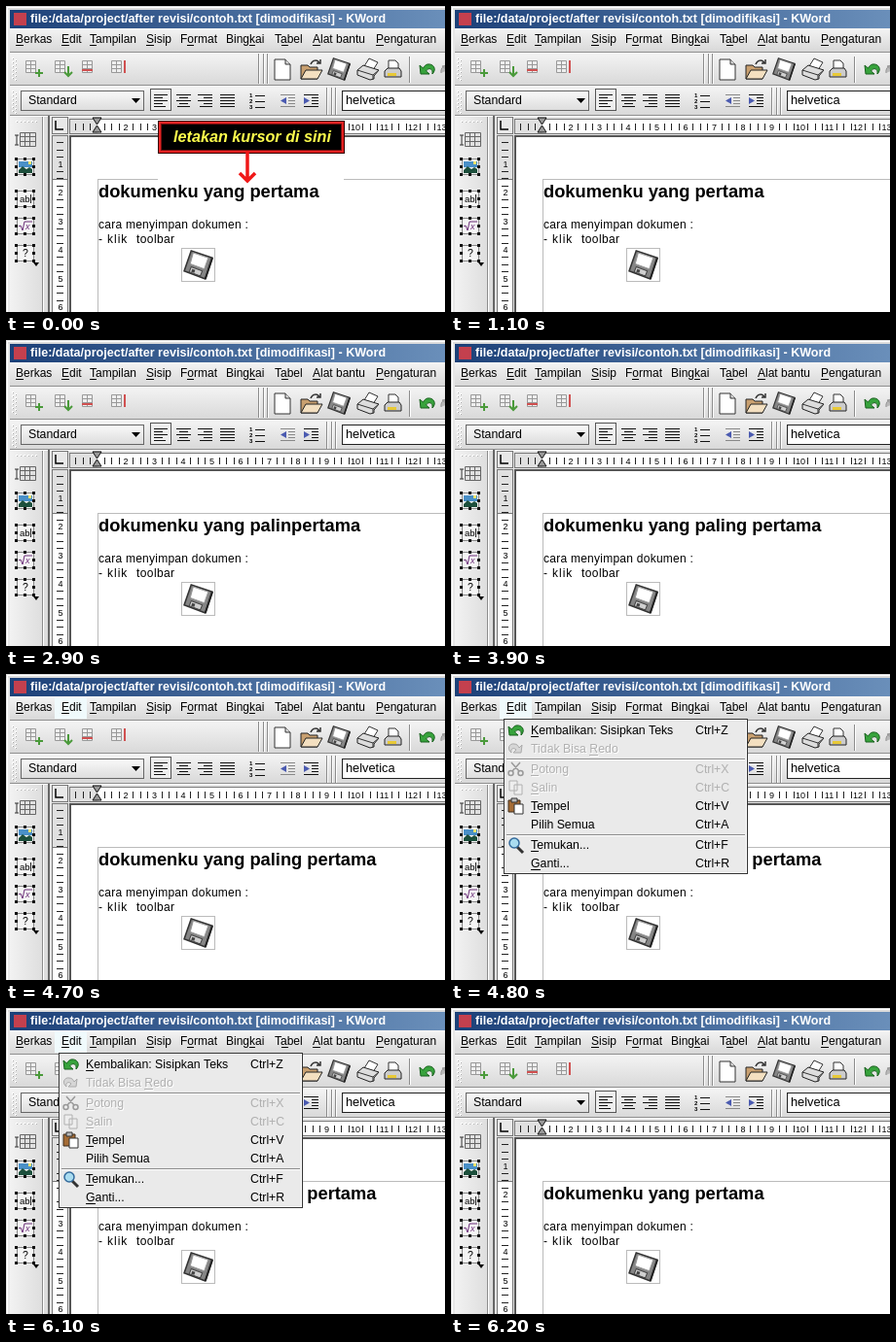
Animation of 451 by 315 pixels, one loop 8700 ms. Source, as an HTML page with a canvas:

```html
<!DOCTYPE html>
<html lang="id">
<head>
<meta charset="utf-8">
<title>Kembalikan teks</title>
<style>
html, body { margin: 0; width: 100%; height: 100%; overflow: hidden; background: #e6e6e6 }
canvas { display: block }
</style>
</head>
<body>
<canvas id="stage" width="451" height="315"></canvas>
<script>
const ctx = document.getElementById('stage').getContext('2d');
const LOOP = 8700;
const SANS = '"Liberation Sans", Arial, sans-serif';

function rect(color, x, y, w, h) {
  ctx.fillStyle = color;
  ctx.fillRect(x, y, w, h);
}

function gradient(from, to, x0, y0, x1, y1) {
  const g = ctx.createLinearGradient(x0, y0, x1, y1);
  g.addColorStop(0, from);
  g.addColorStop(1, to);
  return g;
}

function bar(y, h) {
  rect(gradient('#f4f4f4', '#d8d8d8', 0, y, 0, y + h), 4, y, 447, h);
}

function frame(color, x, y, w, h, lineWidth = 1) {
  ctx.strokeStyle = color;
  ctx.lineWidth = lineWidth;
  ctx.strokeRect(x + lineWidth / 2, y + lineWidth / 2, w - lineWidth, h - lineWidth);
}

// An '&' underlines the letter after it.
function text(label, x, y, size = 12, color = '#000', style = '', spacing = 0) {
  const at = label.indexOf('&');
  const plain = label.replace('&', '');
  ctx.font = `${style} ${size}px ${SANS}`;
  ctx.letterSpacing = spacing + 'px';
  ctx.fillStyle = color;
  ctx.fillText(plain, x, y);
  if (at >= 0) {
    const left = ctx.measureText(plain.slice(0, at)).width;
    rect(color, Math.round(x + left), y + 2, Math.round(ctx.measureText(plain[at]).width), 1);
  }
}

function shape(d, x, y, fill, stroke, lineWidth = 1) {
  const path = new Path2D(d);
  ctx.save();
  ctx.translate(x, y);
  if (fill) { ctx.fillStyle = fill; ctx.fill(path); }
  if (stroke) { ctx.strokeStyle = stroke; ctx.lineWidth = lineWidth; ctx.stroke(path); }
  ctx.restore();
}

function hLine(y, x = 4, w = 447) {
  rect('#8c8c8c', x, y, w, 1);
  rect('#fff', x, y + 1, w, 1);
}

function vLine(x, y, h) {
  rect('#8c8c8c', x, y, 1, h);
  rect('#fff', x + 1, y, 1, h);
}

function grip(x, y, h) {
  for (let i = 0; i < h; i += 4) {
    rect('#fff', x, y + i, 2, 2);
    rect('#aaa', x + 1, y + i + 1, 1, 1);
    rect('#fff', x + 3, y + i + 2, 2, 2);
    rect('#aaa', x + 4, y + i + 3, 1, 1);
  }
}

function floppy(x, y, size) {
  ctx.save();
  ctx.translate(x, y);
  ctx.scale(size / 30, size / 30);
  shape('M8 1L29 8L22 29L1 21Z', 0, 0, '#858585', '#333', 1.5);
  shape('M10 3L25 8L21 19L7 14Z', 0, 0, '#fff', '#999');
  shape('M8 17L19 21L17 26L6 22Z', 0, 0, '#d0d0d0', '#444');
  shape('M9 19L12 20L11 23L8 22Z', 0, 0, '#444');
  shape('M29 8L22 29', 0, 0, null, '#222', 2);
  ctx.restore();
}

function undoArrow(x, y) {
  shape('M0 3L1 12L10 12L6.500 9C9 5 14 6 13 12C18 7 14 1 8 2C6 2.500 4.500 4 3.500 6Z', x, y, '#37a33c', '#17601c');
}

function textLines(x, widths, align) {
  widths.forEach((w, i) => rect('#111', x + Math.round((15 - w) * align), 91 + i * 3, w, 1));
}

function titleBar() {
  rect('#dcdcdc', 0, 0, 451, 4);
  rect('#fff', 1, 1, 450, 1);
  rect(gradient('#1c4078', '#6a8fba', 4, 0, 451, 0), 4, 4, 447, 19);
  rect('#c4404e', 8, 7, 13, 13);
  text('file:/data/project/after revisi/contoh.txt [dimodifikasi] - KWord', 25, 17, 12.55, '#fff', 'bold');
}

function menuBar(editLit) {
  bar(23, 24);
  if (editLit) rect('#f0fafc', 50, 24, 33, 22);
  const labels = [['&Berkas', 10], ['&Edit', 57], ['&Tampilan', 86], ['&Sisip', 144], ['F&ormat', 179],
    ['Bing&kai', 226], ['T&abel', 276], ['&Alat bantu', 315], ['&Pengaturan', 380]];
  for (const [label, x] of labels) text(label, x, 38);
}

function tableIcon(x, extra, color) {
  shape('M0 0H10V12H0ZM0 4H10M0 8H10M5 0V12', x + .5, 56.5, '#eee', '#999');
  shape(extra, x, 56, null, color, 2);
}

function mainToolbar() {
  bar(48, 34);
  hLine(47);
  hLine(81);
  grip(6, 53, 24);
  tableIcon(20, 'M10 13H18M14 9V17', '#4a9a3a');
  tableIcon(50, 'M14 6V16M10 12L14 16L18 12', '#4a9a3a');
  tableIcon(78, 'M0 10H11', '#d05050');
  tableIcon(108, 'M14 0V13', '#d05050');
  for (const x of [259, 264, 268]) vLine(x, 49, 31);
  shape('M0 0H11L16 5V21H0Z', 276, 55, '#fff', '#333');
  shape('M11 0V5H16', 276, 55, '#ddd', '#333');
  // Folder
  shape('M1 20V6H8L10 8H18V20Z', 302, 55, '#c9a070', '#222');
  shape('M1 20L6 11H23L18 20Z', 302, 55, '#f3dfc0', '#222');
  shape('M11 5C13 0 18 0 20 4M17 4H21V0', 302, 55, null, '#333', 1.5);
  floppy(330, 53, 24);
  // Printer
  shape('M8 8L13 0L22 4L17 12Z', 360, 54, '#fff', '#333');
  shape('M1 12L7 7L23 12L18 18V21L14 22L1 17Z', 360, 54, '#ddd', '#222');
  shape('M1 12L17 17L23 12M17 17V21', 360, 54, null, '#333');
  // Print preview
  shape('M4 0H11L14 3V11H4Z', 389, 56, '#fff', '#333');
  shape('M0 11L3 8H15L17 11V17H0Z', 389, 56, '#ccc', '#222');
  rect('#e8c936', 392, 69, 9, 3);
  vLine(414, 52, 27);
  undoArrow(425, 58);
  shape('M0 3L9 10V1ZM8 6C3 0 -2 4 -1 10', 448, 59, '#b8b8b8', '#999');
}

function formatToolbar() {
  bar(83, 30);
  hLine(112);
  grip(6, 87, 22);
  rect(gradient('#fafafa', '#dcdcdc', 0, 87, 0, 108), 15, 87, 127, 21);
  frame('#666', 15, 87, 127, 21);
  text('Standard', 23, 101, 12.3);
  shape('M0 0H9L4.500 5Z', 129, 95, '#000');
  rect('#eee', 148, 85, 22, 23);
  frame('#555', 148, 85, 22, 23);
  textLines(152, [14, 9, 14, 9, 12], 0);
  textLines(175, [15, 9, 15, 9, 13], .5);
  textLines(197, [15, 9, 15, 9, 13], 1);
  textLines(220, [15, 15, 15, 15, 15], 0);
  for (let i = 0; i < 3; i++) {
    text(String(i + 1), 250, 94 + i * 6, 6, '#000', 'bold');
    rect('#111', 256, 92 + i * 6, 10, 1);
  }
  for (const [x, color, arrow] of [[282, '#888', 'M6 0L0 3.500L6 7Z'], [306, '#111', 'M0 0L6 3.500L0 7Z']]) {
    rect(color, x, 91, 15, 1);
    rect(color, x, 103, 15, 1);
    for (let i = 0; i < 3; i++) rect(color, x + 8, 94 + i * 3, 7, 1);
    shape(arrow, x, 94, '#4a5ab0');
  }
  for (const x of [329, 334, 338]) vLine(x, 84, 28);
  rect('#fff', 345, 87, 110, 21);
  frame('#222', 345, 87, 110, 21);
  text('helvetica', 349, 101, 12.8);
}

function rulers() {
  rect('#fff', 66, 117, 385, 14);
  rect('#e0e0e0', 66, 117, 28, 14);
  frame('#777', 65, 116, 390, 16);
  rect('#fff', 48, 134, 15, 181);
  rect('#e0e0e0', 48, 134, 15, 44);
  frame('#777', 47, 133, 17, 186);
  rect('#777', 48, 178, 15, 1);
  const unit = 29.5;
  ctx.textAlign = 'center';
  for (let n = 0; n < 14; n++) {
    for (let q = 1; q < 4; q++) {
      const offset = Math.round((n + q / 4) * unit);
      rect('#222', 64 + offset, 121, 1, 7);
      rect('#222', 52, 133 + offset, 7, 1);
    }
    if (n > 1) text(String(n), 64 + n * unit, 128, 9);
    if (n > 0) text(String(n), 56, 136 + n * unit, 9);
  }
  ctx.textAlign = 'left';
  // Indent markers
  shape('M0 0H9L4.500 7ZM0 15H9L4.500 8Z', 89, 115, '#999', '#111');
  rect('#e8e8e8', 47, 114, 17, 18);
  frame('#777', 47, 114, 17, 18);
  shape('M1 0V9H9', 50, 118, null, '#000', 1.5);
}

function sideToolbar() {
  rect(gradient('#f2f2f2', '#dadada', 4, 0, 44, 0), 4, 114, 40, 201);
  vLine(37, 114, 201);
  rect('#666', 43, 113, 2, 202);
  for (let x = 10; x < 32; x += 4) {
    rect('#fff', x, 118, 2, 2);
    rect('#aaa', x + 1, 119, 1, 1);
  }
  shape('M4 1H20V15H4ZM4 5H20M4 10H20M9 1V15M14 1V15', 10.5, 129.5, '#e0e0e0', '#666');
  shape('M0 5V15M-2 5H2M-2 15H2', 11, 128, null, '#333');
  for (const y of [156, 189, 217, 245]) {
    rect('#f4f4f4', 11, y + 1, 18, 17);
    frame('#888', 11, y + 1, 18, 17);
    for (const x of [9, 18, 27]) for (const dy of [0, 8, 16]) {
      if (x !== 18 || dy !== 8) rect('#111', x, y + dy, 3, 3);
    }
  }
  rect('#4a90c8', 13, 160, 14, 6);
  shape('M0 6L4 2L8 5L11 3L14 5V9H0Z', 13, 163, '#1c4f3c');
  rect('#f2e36d', 23, 160, 3, 3);
  text('ab', 14, 202, 9.5);
  rect('#222', 25, 194, 1, 9);
  shape('M0 5L2 4L4 9L6 0H14', 13, 222, null, '#6b2d78');
  text('x', 20, 230, 9, '#6b2d78', 'italic');
  text('?', 17, 258, 10.5);
  shape('M0 0H6L3 4Z', 28, 264, '#000');
}

function documentPage(typed, cursor) {
  rect('#fff', 66, 134, 385, 181);
  frame('#555', 65, 133, 390, 190, 2);
  rect('#bbb', 94, 178, 357, 1);
  rect('#bbb', 94, 178, 1, 137);
  text(`dokumenku yang ${typed}pertama`, 95, 197, 18.3, '#000', 'bold');
  if (cursor) rect('#000', 250, 182, 1, 20);
  text('cara menyimpan dokumen :', 95, 229, 12, '#000', '', .25);
  text('-', 95, 244);
  text('klik', 104, 244, 12, '#000', '', 1);
  text('toolbar', 134, 244, 12, '#000', '', .4);
  frame('#bbb', 180, 249, 35, 35);
  floppy(182, 251, 31);
}

function callout() {
  rect('#fff', 156, 151, 191, 30);
  rect('#300', 156, 118, 192, 34);
  rect('#000', 158, 120, 188, 30);
  frame('#e52222', 157, 119, 190, 32, 2);
  frame('#7a1010', 159, 121, 186, 28);
  text('letakan kursor di sini', 172, 140, 16.2, '#ffff4d', 'italic bold');
  shape('M0 0V31M-8 23L0 31L8 23', 248, 149, null, '#f01818', 3.5);
}

function editMenu(itemLit) {
  rect('#eaeaea', 54, 46, 251, 160);
  frame('#333', 54, 46, 251, 160);
  frame('#fff', 55, 47, 249, 158);
  if (itemLit) rect('#70d8e6', 57, 49, 245, 18);
  hLine(87, 57, 245);
  hLine(165, 57, 245);
  const items = [['&Kembalikan: Sisipkan Teks', 'Z', 62], ['Tidak Bisa &Redo', '', 81, 1], ['&Potong', 'X', 102, 1],
    ['&Salin', 'C', 121, 1], ['&Tempel', 'V', 140], ['Pilih Semua', 'A', 159], ['&Temukan...', 'F', 180], ['&Ganti...', 'R', 199]];
  for (const [label, key, y, disabled] of items) {
    if (disabled) text(label, 83, y + 1, 12.3, '#fff');
    text(label, 82, y, 12.3, disabled ? '#b0b0b0' : '#000');
    if (key) text('Ctrl+' + key, 251, y, 12.3, disabled ? '#b0b0b0' : '#000');
  }
  undoArrow(59, 51);
  shape('M14 4L13 12L5 12L8 9C5 6 2 8 3 12C-2 8 1 2 6 3C9 3 10 5 11 7Z', 59, 69, '#d6d6d6', '#aaa');
  shape('M3 0L11 9M12 0L4 9M5 11A2.500 2.500 0 1 1 0 11A2.500 2.500 0 1 1 5 11M15 11A2.500 2.500 0 1 1 10 11A2.500 2.500 0 1 1 15 11', 59, 91, null, '#999', 1.5);
  shape('M0 0H8V10H0ZM5 4H13V14H5Z', 60, 110, '#eee', '#b0b0b0');
  shape('M0 2H12V14H0Z', 59, 128, '#a56c35', '#3d2c1d');
  shape('M3 0H9V4H3Z', 59, 128, '#bbb', '#333');
  shape('M6 6H15V16H6Z', 59, 128, '#fff', '#333');
  shape('M9 10L15 16', 59, 168, null, '#333', 3);
  shape('M11 6A5 5 0 1 1 1 6A5 5 0 1 1 11 6', 59, 168, '#a9dcf0', '#336a9c', 1.5);
}

function draw(now) {
  const t = now % LOOP;
  const blink = start => t >= start && t < start + 400 && Math.floor((t - start) / 100) % 2 === 0;
  const menuOpen = t >= 4800 && t < 6200;
  const step = Math.min(5, Math.floor((t - 1400) / 500));
  const typed = t >= 1400 && t < 6200 ? 'paling '.slice(0, [1, 2, 4, 5, 6, 7][step]) : '';

  rect('#e6e6e6', 0, 0, 451, 315);
  titleBar();
  menuBar(menuOpen || blink(4500));
  mainToolbar();
  formatToolbar();
  sideToolbar();
  rulers();
  documentPage(typed, blink(1000));
  rect('#fff', 1, 1, 1, 314);
  if (t < 1000) callout();
  if (menuOpen) editMenu(blink(5800));
  requestAnimationFrame(() => draw(performance.now()));
}
draw(0);
</script>
</body>
</html>
```
